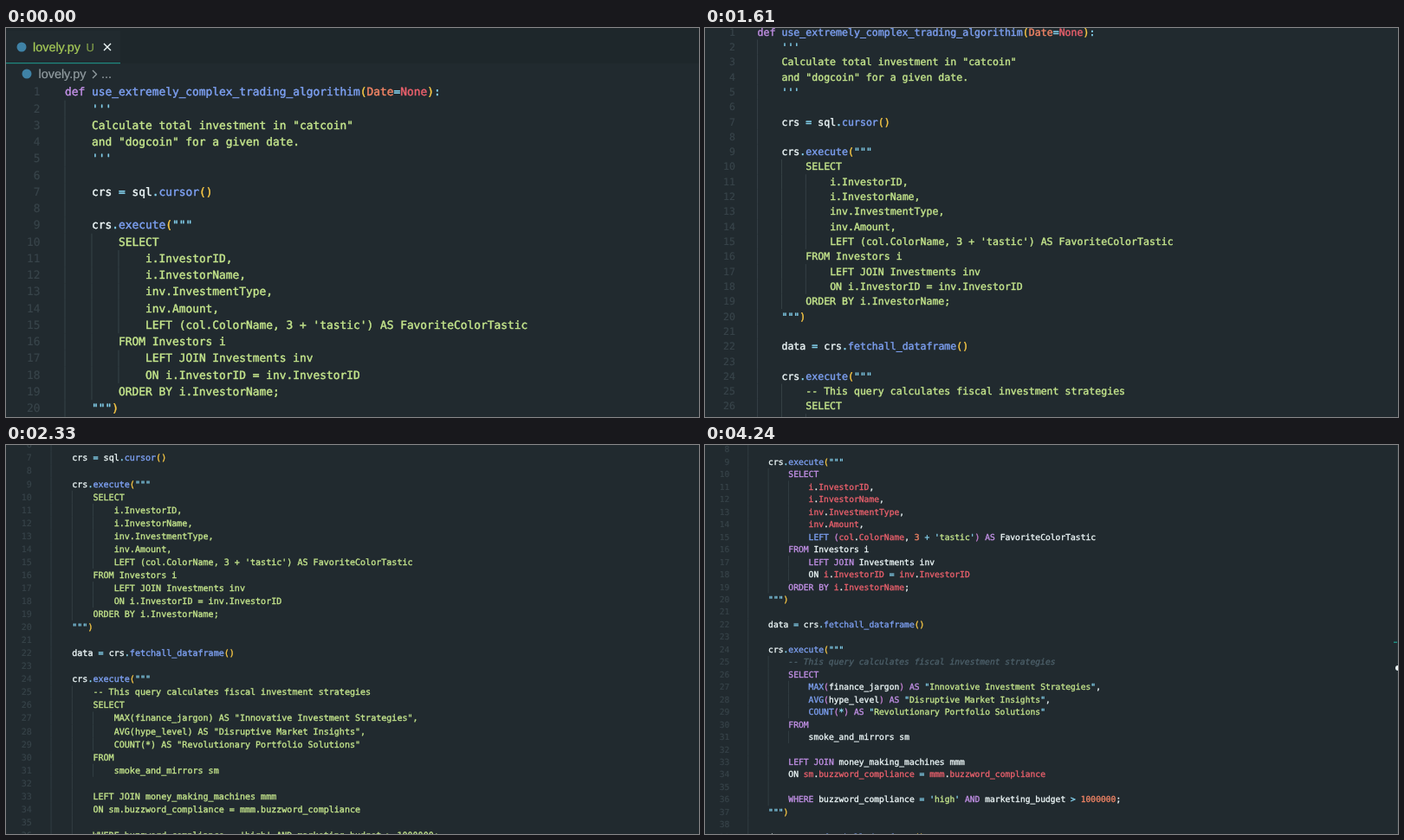
Write an HTML page with a canvas that moves like this. It is 800 by 450 pixels and loops after 4420 ms.

```html
<!DOCTYPE html>
<html lang="en">
<head>
<meta charset="utf-8">
<title>Code editor zoom</title>
<style>
html, body { margin: 0; width: 100%; height: 100%; overflow: hidden; background: #212a2f; }
canvas { display: block; }
</style>
</head>
<body>
<canvas id="stage" width="800" height="450"></canvas>
<script>
const ctx = document.getElementById('stage').getContext('2d');
const LOOP = 4420, RECOLOUR = 2820, POINTER = 3900;
const SIZE = 12.87, CHAR = 7.745, ROW = 19.26, LEFT = 68, TOP = 74;
const MONO = `${SIZE}px "DejaVu Sans Mono", monospace`;
const SANS = '14.4px "Liberation Sans", Arial, sans-serif';
const C = {
  bg: '#212a2f', bar: '#1e272b', white: '#eef8f9', green: '#c5e68c', cyan: '#86d5f2',
  blue: '#7da0f2', purple: '#c290e6', red: '#ea606c', orange: '#f38565', gold: '#fac945',
  pink: '#c580d3', comment: '#4c5f69', guide: '#374348', number: '#38444a',
  teal: '#1f8b80', grey: '#929da1', icon: '#3f82a6'
};

const lines = `def use_extremely_complex_trading_algorithim(Date=None):
    '''
    Calculate total investment in "catcoin"
    and "dogcoin" for a given date.
    '''
    
    crs = sql.cursor()
    
    crs.execute("""
        SELECT
            i.InvestorID,
            i.InvestorName,
            inv.InvestmentType,
            inv.Amount,
            LEFT (col.ColorName, 3 + 'tastic') AS FavoriteColorTastic
        FROM Investors i
            LEFT JOIN Investments inv
            ON i.InvestorID = inv.InvestorID
        ORDER BY i.InvestorName;
    """)
    
    data = crs.fetchall_dataframe()
    
    crs.execute("""
        -- This query calculates fiscal investment strategies
        SELECT
            MAX(finance_jargon) AS "Innovative Investment Strategies",
            AVG(hype_level) AS "Disruptive Market Insights",
            COUNT(*) AS "Revolutionary Portfolio Solutions"
        FROM
            smoke_and_mirrors sm
        
        LEFT JOIN money_making_machines mmm
        ON sm.buzzword_compliance = mmm.buzzword_compliance
        
        WHERE buzzword_compliance = 'high' AND marketing_budget > 1000000;
    """)
    
    data = crs.fetchall_dataframe()`.split('\n');

// Each rule is [pattern, colour]; the first that matches wins.
const python = [
  [`'''|"""|[=.:]`, C.cyan], ['def\\b', C.purple], ['\\w+(?=\\()', C.blue],
  ['Date', C.orange], ['None', C.red], ['[()]', C.gold], ['\\w+', C.white]
];
const docs = [['\\S.*', C.green]];
const sql = [
  ['--.*', C.comment], [`(?<=["'])[^"',)]+(?=["'])`, C.green], [`["'*=>+]`, C.cyan],
  ['LEFT(?= \\()|MAX|AVG|COUNT', C.blue],
  ['\\b(?:SELECT|FROM|LEFT|JOIN|ORDER BY|WHERE|AND|AS)\\b', C.purple],
  ['\\w+(?=\\.)|(?<=\\.)\\w+', C.red], ['\\b\\d+', C.orange],
  ['[()]', C.pink], ['\\w+|\\S', C.white]
];

function tokenize(text, rules) {
  const pattern = new RegExp(rules.map(r => `(${r[0]})`).join('|'), 'g');
  return [...text.matchAll(pattern)].map(m => ({
    text: m[0], col: m.index, colour: rules[m.slice(1).findIndex(g => g !== undefined)][1]
  }));
}

let quoted = false;
const rows = lines.map(text => {
  const fence = /'''|"""/.test(text);
  const inside = quoted && !fence;
  if (fence) quoted = !quoted;
  return {
    depth: text.search(/\S|$/) / 4,
    plain: tokenize(text, inside ? docs : python),
    rich: tokenize(text, inside ? sql : python)
  };
});

// Zoom keys: time, progress, speed per ms.
const keys = [
  [910, 0, 0], [1180, .084, .00058], [1610, .406, .00073],
  [1880, .593, .00067], [2330, .877, .00052], [2760, 1, 0]
];

function zoomAt(t) {
  if (t <= keys[0][0]) return 0;
  const i = keys.findIndex(k => t < k[0]);
  if (i < 0) return 1;
  const [t0, p0, v0] = keys[i - 1], [t1, p1, v1] = keys[i];
  const d = t1 - t0, u = (t - t0) / d, w = 1 - u;
  return w * w * ((1 + 2 * u) * p0 + u * d * v0) + u * u * ((3 - 2 * u) * p1 - w * d * v1);
}

function box(x, y, w, h, colour) {
  ctx.fillStyle = colour;
  ctx.fillRect(x, y, w, h);
}

// The outline gives the letters their medium weight.
function label(text, x, y, colour, font = MONO, weight = .45) {
  ctx.font = font;
  ctx.fillStyle = ctx.strokeStyle = colour;
  ctx.lineWidth = weight;
  ctx.fillText(text, x, y);
  ctx.strokeText(text, x, y);
}

function dot(x, y, r, colour) {
  ctx.fillStyle = colour;
  ctx.beginPath();
  ctx.arc(x, y, r, 0, 7);
  ctx.fill();
}

function stroke(path, colour) {
  ctx.strokeStyle = colour;
  ctx.lineWidth = 1.4;
  ctx.stroke(new Path2D(path));
}

function drawHeader() {
  box(0, 0, 1100, 3, C.bar);
  box(132, 0, 968, 41, C.bar);
  dot(18, 22, 5.5, C.icon);
  label('lovely.py', 31, 27.3, '#a5c957', SANS, .25);
  label('U', 92.5, 27.3, '#7f9b48', '13px "Liberation Sans", Arial, sans-serif', .25);
  stroke('M113 18l8 8m0-8l-8 8', C.white);
  box(-5, 40, 137, 1.2, C.teal);
  dot(24, 53, 5.5, C.icon);
  label('lovely.py', 37.5, 57.7, C.grey, SANS, .2);
  stroke('M100 49l4.5 4.5l-4.5 4.5', C.grey);
  label('...', 110, 57.7, C.grey, SANS, .2);
}

function drawCode(rich) {
  rows.forEach((row, i) => {
    const y = TOP + i * ROW, base = y + 4.3, number = String(i + 1);
    label(number, 39.5 - number.length * CHAR, base, C.number, MONO, .2);
    for (let d = 0; d < row.depth; d++)
      box(LEFT + d * 4 * CHAR - .5, y - ROW / 2, 1, ROW, C.guide);
    for (const { text, col, colour } of rich ? row.rich : row.plain)
      label(text, LEFT + col * CHAR, base, colour, colour === C.comment ? 'italic ' + MONO : MONO);
  });
}

function draw(now) {
  const t = now % LOOP, s = 1 - .249 * zoomAt(t);
  ctx.setTransform(1, 0, 0, 1, 0, 0);
  box(0, 0, 800, 450, C.bg);
  ctx.textRendering = 'geometricPrecision';
  ctx.lineJoin = 'round';
  // The zoom closes in on a point above and left of the stage.
  ctx.setTransform(s, 0, 0, s, -5 * (1 - s), -609 * (1 - s));
  drawHeader();
  drawCode(t >= RECOLOUR);
  ctx.setTransform(1, 0, 0, 1, 0, 0);
  if (t >= RECOLOUR) box(795, 227.5, 5, 1.5, C.teal);
  if (t >= POINTER) {
    box(799, 0, 1, 450, '#2b363b');
    dot(800, 258, 3, C.white);
  }
  requestAnimationFrame(draw);
}
requestAnimationFrame(draw);
</script>
</body>
</html>
```
